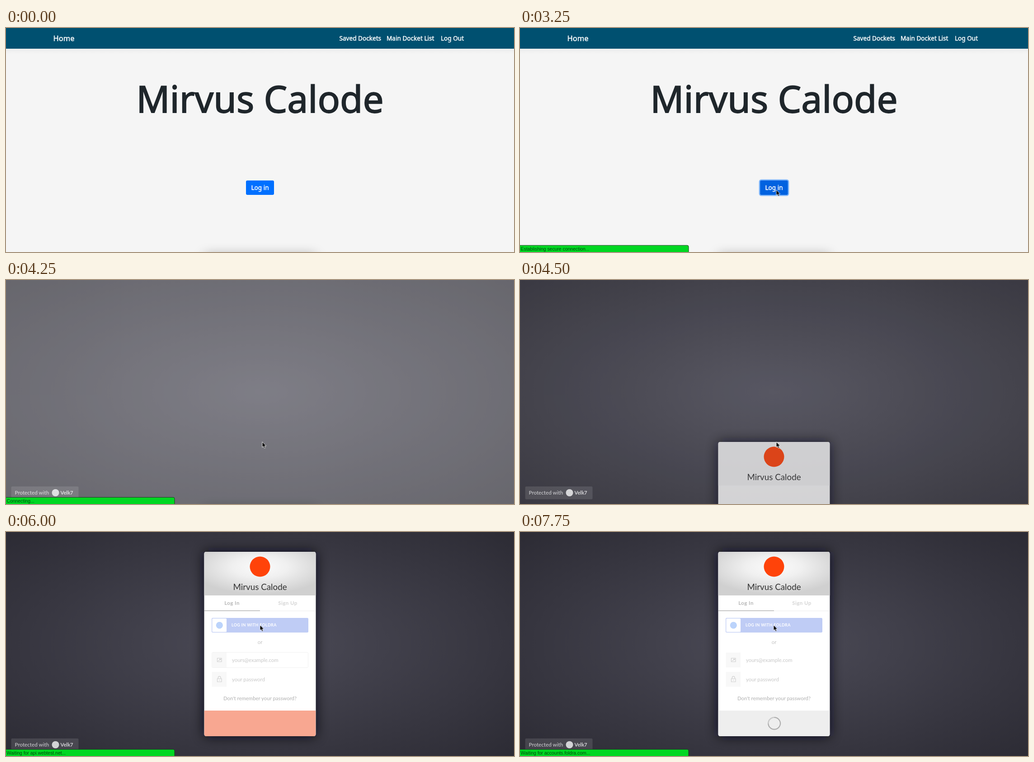
Animation of 1124x498 px, one loop 8000 ms. Source, as an HTML page:

```html
<!DOCTYPE html>
<html lang="en">
<head>
<meta charset="utf-8">
<title>Login flow</title>
<style>
html, body { margin: 0; width: 100%; height: 100%; overflow: hidden; background: #fff; }
svg { display: block; width: 1124px; height: 498px; }
/* a thin stroke gives the regular face a medium weight */
.page text { font: 13.6px "Noto Sans", "Open Sans", sans-serif; fill: #fff; stroke: #fff; stroke-width: .45px; }
.page .brand { font-size: 16.5px; }
.page .title { font-size: 82px; fill: #1f262b; stroke: #1f262b; stroke-width: 1.8px; }
.lock { font: 11.4px Lato, "Open Sans", sans-serif; }
.bold { font-weight: 700; }
.mid { text-anchor: middle; }
.status text { font: 10.4px "Liberation Sans", Arial, sans-serif; fill: #00480c; }

/* One loop is 8 s in 32 ticks of 3.125 % each */
.page, .focus, .overlay, .card, .grow, .panel, .head, .form, .fade, .field, .submit, .label,
.busy, .status, .s1, .s2, .s3, .s4, .cursor { animation: 8s step-end infinite; }

.page { animation-name: page; }
@keyframes page { 0% { visibility: visible } 43.75%, 100% { visibility: hidden } }

.focus { animation-name: focus; }
@keyframes focus { 0% { opacity: 0 } 34.375%, 100% { opacity: 1 } }

.overlay { animation-name: overlay; }
@keyframes overlay {
  0% { opacity: 0 } 53.125% { opacity: .72 } 56.25% { opacity: .93 } 59.375%, 100% { opacity: 1 }
}

.card { animation-name: card; }
@keyframes card {
  0% { opacity: 0; transform: translateY(480px) }
  53.125% { opacity: .4; transform: translateY(466px) }
  56.25% { opacity: .8; transform: translateY(316px) }
  59.375% { opacity: 1; transform: translateY(130px) }
  62.5% { opacity: 1; transform: translateY(71px) }
  65.625%, 100% { opacity: 1; transform: none }
}
.grow { animation-name: grow; }
@keyframes grow { 0% { height: 276px } 65.625%, 100% { height: 410px } }
.panel { animation-name: grow, panel; }
@keyframes panel { 0% { fill: #f8f8f8 } 65.625%, 100% { fill: #fff } }
.head { animation-name: head; }
@keyframes head { 0% { opacity: 0 } 68.75%, 100% { opacity: 1 } }

.form { animation-name: form; }
@keyframes form { 0% { visibility: hidden } 65.625%, 100% { visibility: visible } }
.fade { animation-name: fade; }
@keyframes fade { 0% { opacity: 1 } 75%, 100% { opacity: .36 } }
.field { animation-name: field; }
@keyframes field { 0% { stroke: #d8d8d8 } 84.375%, 100% { stroke: #fff } }
.submit { animation-name: submit; }
@keyframes submit { 0% { fill: #ff4612 } 75% { fill: #f8a791 } 78.125%, 100% { fill: #eee } }
.label { animation-name: label; }
@keyframes label { 0% { opacity: 1 } 75%, 100% { opacity: 0 } }
.busy { animation-name: busy; }
@keyframes busy { 0% { opacity: 0 } 78.125%, 100% { opacity: 1 } }
.spin { transform-origin: 562.7px 425.5px; animation: spin 1s steps(4) infinite; }
@keyframes spin { to { transform: rotate(360deg) } }

.status { animation-name: status; }
@keyframes status {
  0% { opacity: 0 } 37.5% { opacity: 1 } 56.25% { opacity: 0 } 75%, 100% { opacity: 1 }
}
.s1 { animation-name: s1; }
@keyframes s1 { 0% { opacity: 1 } 46.875%, 100% { opacity: 0 } }
.s2 { animation-name: s2; }
@keyframes s2 { 0% { opacity: 0 } 46.875% { opacity: 1 } 56.25%, 100% { opacity: 0 } }
.s3 { animation-name: s3; }
@keyframes s3 { 0% { opacity: 0 } 75% { opacity: 1 } 87.5%, 100% { opacity: 0 } }
.s4 { animation-name: s4; }
@keyframes s4 { 0% { opacity: 0 } 87.5%, 100% { opacity: 1 } }

.cursor { animation-name: cursor; }
@keyframes cursor {
  0% { transform: translate(-40px, -40px) }
  3.125% { transform: translate(668px, 128px) }
  6.25% { transform: translate(642px, 190px) }
  9.375% { transform: translate(604px, 262px) }
  12.5% { transform: translate(575px, 305px) }
  15.625% { transform: translate(551.5px, 348px) }
  28.125% { transform: translate(555px, 351px) }
  31.25% { transform: translate(562px, 357px) }
  34.375% { transform: translate(566.5px, 359.5px) }
  59.375% { transform: translate(568px, 352px) }
  62.5% { transform: translate(569.5px, 339px) }
  65.625% { transform: translate(566px, 283px) }
  68.75% { transform: translate(562px, 225px) }
  71.875% { transform: translate(561.5px, 206.5px) }
  87.5%, 100% { transform: translate(560.5px, 206.5px) }
}
</style>
</head>
<body>
<svg viewBox="0 0 1124 498">
  <defs>
    <filter id="soft" x="-50%" y="-80%" width="200%" height="260%"><feGaussianBlur stdDeviation="14"/></filter>
    <linearGradient id="navShade" x2="0" y2="1">
      <stop stop-color="#000" stop-opacity=".035"/><stop offset="1" stop-opacity="0"/>
    </linearGradient>
    <radialGradient id="dark" r=".7071">
      <stop stop-color="#4c4b57"/><stop offset="1" stop-color="#2c2b34"/>
    </radialGradient>
    <radialGradient id="headShade" cy=".35" r=".62">
      <stop stop-color="#fbfbfb"/><stop offset=".4" stop-color="#f0f0f0"/><stop offset="1" stop-color="#d0d0d0"/>
    </radialGradient>
    <clipPath id="round"><rect x="438.5" y="44" width="247" height="410" rx="4.5"/></clipPath>
  </defs>

  <g class="page">
    <rect width="1124" height="498" fill="#f5f5f5"/>
    <rect x="439" y="506" width="246" height="80" fill="#000" opacity=".36" filter="url(#soft)"/>
    <rect y="46" width="1124" height="12" fill="url(#navShade)"/>
    <rect width="1124" height="46" fill="#005070"/>
    <text class="brand" x="104.5" y="28.5">Home</text>
    <text x="737.5" y="28">Saved Dockets</text>
    <text x="842" y="28">Main Docket List</text>
    <text x="962" y="28">Log Out</text>
    <text class="title mid" x="562" y="187.5">Mirvus Calode</text>
    <rect x="531" y="339" width="62" height="32" rx="3.3" fill="#0070ff"/>
    <rect class="focus" x="530" y="337.7" width="64" height="34.6" rx="4" fill="#0062e0" stroke="#7db5fa" stroke-width="2.6"/>
    <text class="mid" x="562" y="360">Log in</text>
  </g>

  <g class="lock">
    <g class="overlay">
      <rect width="1124" height="498" fill="url(#dark)"/>
      <rect x="11.5" y="459" width="149" height="28.5" rx="2.5" fill="#fff" opacity=".11"/>
      <g fill="#d3d3d6">
        <text x="19.5" y="477" font-size="11.7">Protected with</text>
        <circle cx="109.5" cy="473" r="8"/>
        <text class="bold" x="120.5" y="477.3" font-size="11.2">Velk7</text>
      </g>
    </g>

    <g class="card">
      <rect class="grow" x="438.5" y="44" width="247" height="276" rx="4.5" fill="#0c0c12" opacity=".9" filter="url(#soft)"/>
      <rect class="panel" x="438.5" y="44" width="247" height="276" rx="4.5"/>
      <g clip-path="url(#round)">
        <rect x="438.5" y="44" width="247" height="97" fill="#f1f1f1"/>
        <rect class="head" x="438.5" y="44" width="247" height="97" fill="url(#headShade)"/>
        <circle cx="562" cy="77" r="22.5" fill="#ff430a"/>
        <text class="mid" x="562" y="128.5" font-size="18.8" fill="#333">Mirvus Calode</text>

        <g class="form">
          <g class="fade">
            <path d="M438.5 175.3H685.5" stroke="#ccc"/>
            <path d="M438.5 175H562" stroke="#333" stroke-width="1.6"/>
            <g class="mid bold" letter-spacing=".5">
              <text x="500" y="161.5" fill="#333">Log In</text>
              <text x="623.5" y="161.5" fill="#888">Sign Up</text>
            </g>

            <rect x="455" y="191" width="214" height="32.5" rx="2.5" fill="#4d71e3"/>
            <rect x="456.3" y="192.3" width="31.7" height="30" rx="1.5" fill="#fff"/>
            <circle cx="472.3" cy="207.3" r="7.6" fill="#4285f4"/>
            <text class="bold" x="499" y="210.4" font-size="8.9" letter-spacing=".35" fill="#fff">LOG IN WITH FOLDRA</text>
            <text class="mid" x="562" y="249" fill="#555">or</text>

            <rect class="field" x="455.5" y="267.5" width="213" height="34" rx="2.5" fill="none"/>
            <path d="M455.5 268h32.5v33h-32.5zM455.5 311h32.5v33h-32.5z" fill="#ececec"/>
            <g fill="none" stroke="#777" stroke-width="1.1">
              <path d="M467.5 280.5h9.5v8h-9.5zM469.5 286.5l5.5-4m-3 0h3v2.5"/>
              <path d="M467.5 326h9.5v7h-9.5zM469.3 326v-2.2a2.9 2.9 0 0 1 5.8 0v2.2M472.2 328.5v2"/>
            </g>
            <text x="500" y="288.5" fill="#666">yours@example.com</text>
            <text x="500" y="331.5" fill="#666">your password</text>
            <text class="mid" x="562" y="374" fill="#222">Don't remember your password?</text>
          </g>

          <rect class="submit" x="438.5" y="397" width="247" height="58"/>
          <g class="label">
            <text class="mid bold" x="559" y="430" font-size="12" letter-spacing=".6" fill="#fff">LOG IN</text>
            <path d="M586 422l3.5 3.7-3.5 3.7" fill="none" stroke="#fff" stroke-width="1.6"/>
          </g>
          <g class="busy">
            <g class="spin" fill="none" stroke-width="1.8">
              <circle cx="562.7" cy="425.5" r="13.3" stroke="#9c9c9c"/>
              <path d="M562.7 412.2a13.3 13.3 0 0 1 13.3 13.3" stroke="#c8c8c8"/>
            </g>
          </g>
        </g>
      </g>
    </g>
  </g>

  <g class="status">
    <path d="M-1 483.2H370a3 3 0 0 1 3 3V499H-1z" fill="#00d722" stroke="#173d1c"/>
    <text class="s1" x="1.5" y="495">Establishing secure connection...</text>
    <text class="s2" x="1.5" y="495">Connecting...</text>
    <text class="s3" x="1.5" y="495">Waiting for api.webtest.net...</text>
    <text class="s4" x="1.5" y="495">Waiting for accounts.foldra.com...</text>
  </g>

  <path class="cursor" d="M.5 .5V12.6L3.2 10.1 5.2 14.6 7.4 13.6 5.5 9.3H9.2z" fill="#000" stroke="#fff" stroke-width=".9"/>
</svg>
</body>
</html>
```
